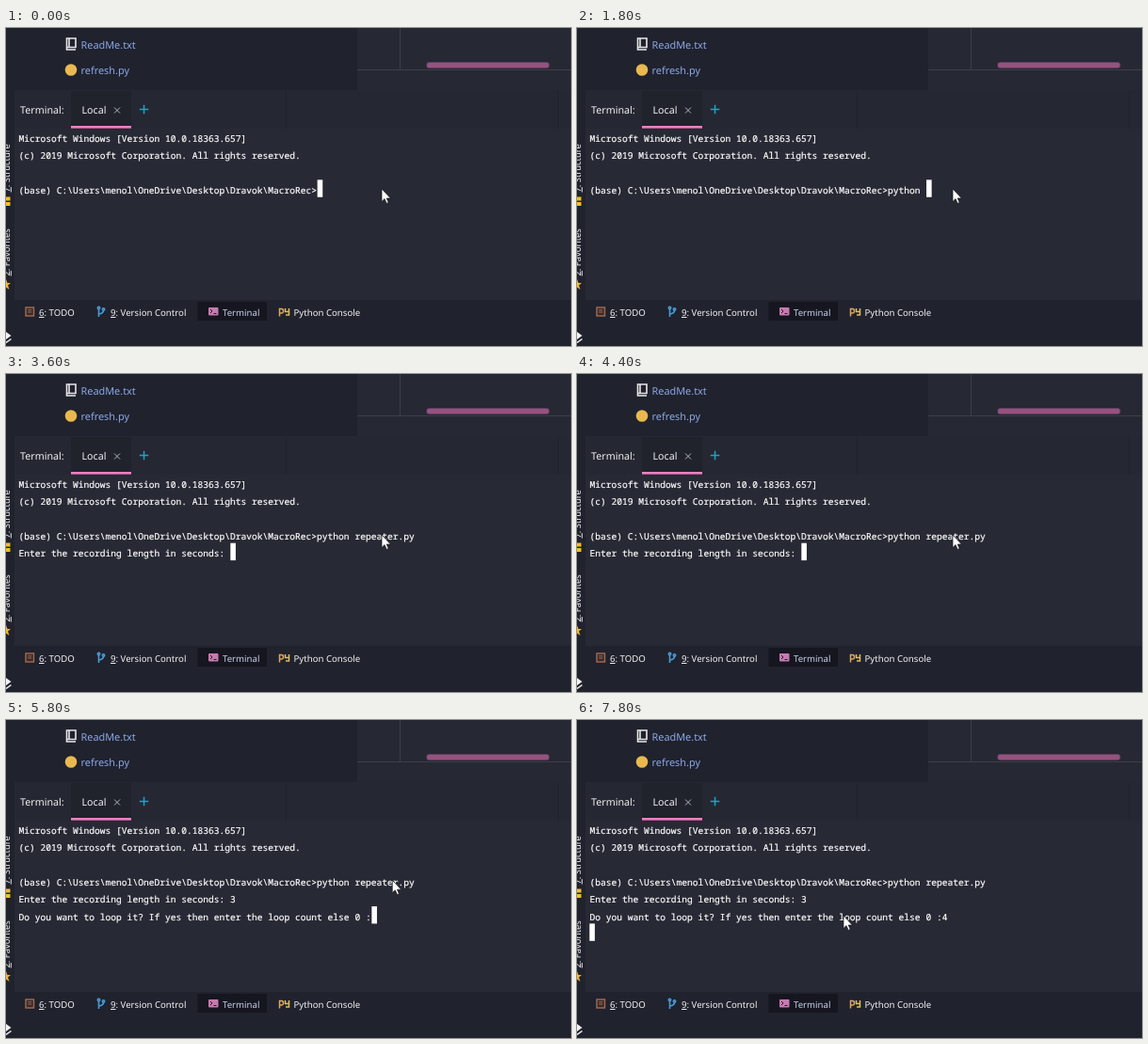
Write an HTML page that moves like this. It is 600 px wide and 338 px high and loops after 8000 ms.

```html
<!DOCTYPE html>
<html lang="en">
<head>
<meta charset="utf-8">
<title>Terminal session</title>
<style>
  html, body { margin: 0; width: 100%; height: 100%; overflow: hidden; background: #20222d; }
  svg { display: block; width: 100%; height: 100%; }
  text { font-family: "Noto Sans", "Open Sans", sans-serif; fill: #f2f2f4; white-space: pre; text-rendering: geometricPrecision; }
  .file { font-size: 10.9px; fill: #8ba8e8; }
  .head { font-size: 10.7px; }
  .tool { font-size: 9.65px; }
  .side { font-size: 9.4px; }
  .key { text-decoration: underline; }
  #screen text { font: 9.6px "Noto Sans Mono", "DejaVu Sans Mono", monospace; fill: #fff; stroke: #fff; stroke-width: .2px; }
</style>
</head>
<body>
<svg viewBox="0 0 600 338">
  <rect width="600" height="338" fill="#20222d"/>

  <!-- Project tree and editor edge -->
  <rect x="373" width="227" height="66" fill="#262833"/>
  <path d="M373 44.5H600M418.5 0V44" stroke="#3c3e48" fill="none"/>
  <rect x="447" y="36.8" width="129.5" height="5.4" rx="2.5" fill="#95527f" stroke="#91507f" stroke-width="1.6" stroke-opacity=".4"/>
  <path d="M64.5 11H74V20.5H64.5Z M64.5 20.5V23H74M67 11V20" fill="none" stroke="#e6e6ea" stroke-width="1.6"/>
  <text class="file" x="79.5" y="21.6">ReadMe.txt</text>
  <circle cx="69" cy="44.5" r="6.3" fill="#e9b950"/>
  <text class="file" x="79.5" y="48.7">refresh.py</text>

  <!-- Terminal header and body -->
  <rect x="9" y="66" width="591" height="41" fill="#252732"/>
  <rect x="9" y="107" width="591" height="182" fill="#272934"/>
  <path d="M297.5 67V107M586.5 67V107" stroke="#20222b" fill="none"/>
  <rect x="69" y="67" width="64" height="37" fill="#20222c"/>
  <rect x="69" y="104" width="64" height="2.6" fill="#f57fc4"/>
  <text class="head" x="15" y="91">Terminal:</text>
  <text class="head" x="80.5" y="91">Local</text>
  <path d="M115 84.5l6 6m0 -6l-6 6" stroke="#b5b6bd"/>
  <path d="M141.8 86.5h9.5m-4.75 -4.75v9.5" stroke="#1fa3c4" stroke-width="1.5"/>

  <!-- Left strip -->
  <g class="side">
    <text transform="translate(3.8 174.5) rotate(-90)"><tspan class="key">7</tspan>: Structure</text>
    <text transform="translate(3.8 263.5) rotate(-90)"><tspan class="key">2</tspan>: Favorites</text>
  </g>
  <path d="M0 179.5h4.5v4H0zM0 185h4.5v4H0z" fill="#f0c020"/>
  <path d="M0 267l1.5 4h3.5l-3 2.5 1.5 4.5-3.5-2.5z" fill="#f2b632"/>
  <path d="M0 323l5.5 4-5.5 4z" fill="#f2f2f2"/>
  <path d="M0 334.5l5.5-4" stroke="#f2f2f2" stroke-width="1.5"/>

  <!-- Tool buttons -->
  <rect x="203.5" y="291" width="73.5" height="20" fill="#15161f"/>
  <g class="tool">
    <text x="35" y="306"><tspan class="key">6</tspan>: TODO</text>
    <text x="111" y="306"><tspan class="key">9</tspan>: Version Control</text>
    <text x="230" y="306" style="fill:#c5d0e8">Terminal</text>
    <text x="305.5" y="306">Python Console</text>
  </g>
  <rect x="21" y="297" width="8.5" height="9" fill="#3a2a2a" stroke="#a06c54" stroke-width="1.4"/>
  <path d="M23.2 299.8h4M23.2 302h4" stroke="#a06c54"/>
  <g stroke="#4a9bd4" fill="none" stroke-width="1.6">
    <path d="M98.5 298V307M98.5 304Q103.5 303.5 103.5 300"/>
    <circle cx="98.5" cy="297.5" r="1.2"/><circle cx="103.5" cy="299" r="1.2"/>
  </g>
  <rect x="215" y="297" width="10.5" height="8.5" rx="1" fill="#c67aae"/>
  <path d="M217 299l2 2-2 2m3.5 .5h3" stroke="#281c2c" fill="none"/>
  <path d="M290.5 306.5V298.5H292.5Q294.5 298.5 294.5 300.8T292.5 303H290.5" fill="none" stroke="#d9a860" stroke-width="1.5"/>
  <path d="M296.5 298V301.5H300.5M300.5 298V305H297" fill="none" stroke="#e0c05c" stroke-width="1.5"/>

  <g id="screen"></g>
  <rect id="caret" width="5.6" height="18.4" fill="#fff"/>
  <path id="pointer" d="M0 0V13.5L3 10.6 5.2 15.4 7.2 14.5 5.2 10H9.4Z" fill="#fff" stroke="#14151b" stroke-width=".7"/>
</svg>
<script>
const LOOP = 8000, LEFT = 13.5, CHAR = 5.77, BASE = 120.8, LINE = 18.35;
const byId = id => document.getElementById(id);
const screen = byId("screen"), caret = byId("caret"), pointer = byId("pointer");

const banner = "Microsoft Windows [Version 10.0.18363.657]\n" +
  "(c) 2019 Microsoft Corporation. All rights reserved.\n\n" +
  "(base) C:\\Users\\menol\\OneDrive\\Desktop\\Dravok\\MacroRec>";
const run = "python repeater.py\n";
const askLength = run + "Enter the recording length in seconds: ";
const askLoop = askLength + "3\nDo you want to loop it? If yes then enter the loop count else 0 :";

// Each step replaces what follows the prompt.
const steps = [
  [0, ""],
  ...[..."python "].map((_, i) => [700 + i * 150, "python ".slice(0, i + 1)]),
  [2200, "python r"], [2400, "python re"],
  [2600, "python Readme.md"], [2900, "python ReadMe.txt"],
  [3000, "python refresh.py"], [3200, "python repeater.py"],
  [3400, run], [3600, askLength],
  [5100, askLength + "3"], [5700, askLoop],
  [6500, askLoop + "4"], [7500, askLoop + "4\n"]
];
const moves = [[0, 399, 171], [5600, 399, 171], [6200, 442, 168], [6800, 442, 168], [7600, 283, 208], [LOOP, 283, 208]];

const rows = Array.from({ length: 7 }, (_, i) => {
  const row = document.createElementNS("http://www.w3.org/2000/svg", "text");
  row.setAttribute("x", LEFT);
  row.setAttribute("y", BASE + i * LINE);
  return screen.appendChild(row);
});

function pointerAt(t) {
  const i = moves.findIndex(m => m[0] > t);
  const [t0, x0, y0] = moves[i - 1], [t1, x1, y1] = moves[i];
  const u = (t - t0) / (t1 - t0), ease = u * u * (3 - 2 * u);
  return [x0 + (x1 - x0) * ease, y0 + (y1 - y0) * ease];
}

let shown;
function draw(now) {
  const t = now % LOOP;
  const text = banner + steps.findLast(s => s[0] <= t)[1];
  if (text !== shown) {
    const lines = text.split("\n"), last = lines.length - 1;
    rows.forEach((row, i) => row.textContent = lines[i] || "");
    caret.setAttribute("x", LEFT - 0.2 + lines[last].length * CHAR);
    caret.setAttribute("y", BASE - 14.5 + last * LINE);
    shown = text;
  }
  pointer.setAttribute("transform", `translate(${pointerAt(t)})`);
  requestAnimationFrame(() => draw(performance.now()));
}
draw(performance.now());
</script>
</body>
</html>
```
